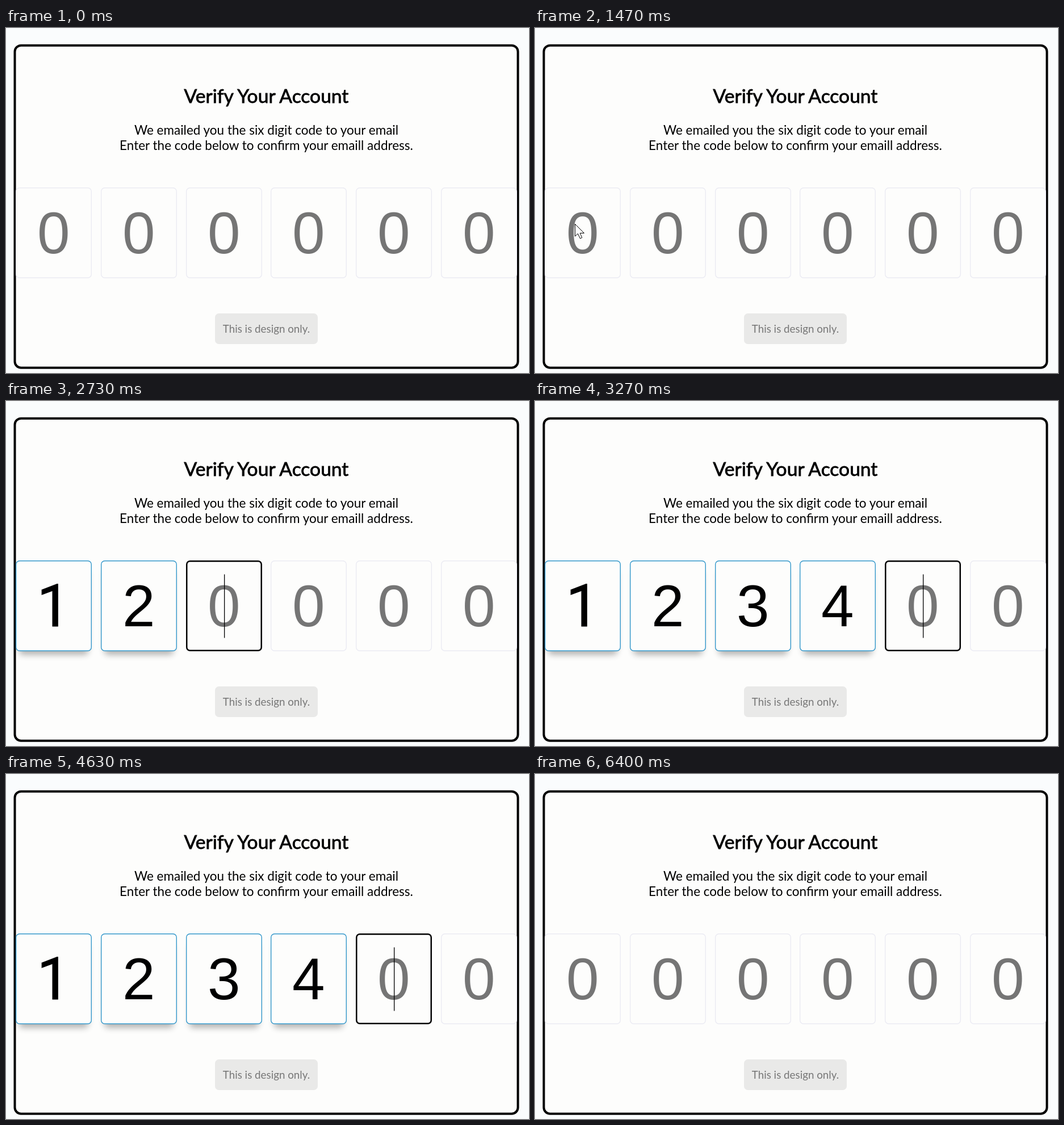
These frames come from a looping animation (921x608 px, 6.43 s). An HTML page:

```html
<!DOCTYPE html>
<html lang="en">
<head>
<meta charset="utf-8">
<title>Verify</title>
<style>
  html, body { margin: 0; width: 100%; height: 100%; overflow: hidden; background: #fafcfd; }
  svg { display: block; width: 921px; height: 608px; }
  text { font-family: Lato, "Open Sans", sans-serif; text-anchor: middle; }
  .title { font-size: 33.6px; stroke: #000; stroke-width: .8px; }
  .copy { font-size: 22.5px; }
  .digit { font-family: "Liberation Sans", Arial, sans-serif; font-size: 103.5px; }
  .digit.plain { font-family: Roboto, sans-serif; stroke: #000; stroke-width: 1px; }
</style>
</head>
<body>
<svg id="stage" viewBox="0 0 921 608">
  <defs>
    <filter id="blur" x="-20%" y="-20%" width="140%" height="140%"><feGaussianBlur stdDeviation="6"/></filter>
  </defs>
  <rect width="921" height="608" fill="#fafcfd"/>
  <rect x="15.5" y="30.7" width="886" height="568" rx="11" fill="#fdfdfc" stroke="#000" stroke-width="4"/>
  <text class="title" x="458.5" y="132">Verify Your Account</text>
  <text class="copy" x="458.5" y="188">We emailed you the six digit code to your email</text>
  <text class="copy" x="458.5" y="214.5">Enter the code below to confirm your emaill address.</text>
  <g id="cells"></g>
  <rect x="368" y="503" width="181" height="54" rx="7" fill="#e9e9e8"/>
  <text x="458.5" y="537" font-size="18.8" fill="#777">This is design only.</text>
  <path id="pointer" d="M0 0V21.5L5 17L9 25.5L12.3 24L8.8 16H16Z" fill="#fff" stroke="#000" stroke-width="1"/>
</svg>
<script>
  const LOOP = 6430;
  const CELL = { x: 17.2, y: 281, w: 134, h: 160, step: 149.7, radius: 7, count: 6 };
  const FOCUS = 1550, BLUR = 6150, BLINK = 500;
  const TYPED = [2350, 2620, 2880, 3150];
  const ERASE = 4700, ERASE_STEP = 50;
  const POINTER = { from: 520, to: 1750 };
  // time, x, y
  const TRAIL = [[520, 470, 262], [870, 245, 293], [1280, 70, 345]];

  const cellsGroup = document.getElementById("cells");
  const pointer = document.getElementById("pointer");

  function add(parent, tag, attrs) {
    const node = document.createElementNS("http://www.w3.org/2000/svg", tag);
    set(node, attrs);
    parent.appendChild(node);
    return node;
  }

  function set(node, attrs) {
    for (const key in attrs) node.setAttribute(key, attrs[key]);
  }

  function show(node, visible) {
    node.setAttribute("visibility", visible ? "visible" : "hidden");
  }

  function makeCell(_, i) {
    const { x, y, w, h, step } = CELL;
    const g = add(cellsGroup, "g", { transform: `translate(${Math.round(x + i * step)} ${y})` });
    return {
      shadow: add(g, "rect", { x: 6.5, y: 19, width: w - 13, height: h - 13, rx: 5, opacity: .3, filter: "url(#blur)" }),
      box: add(g, "rect", { fill: "#fdfdfc" }),
      digit: add(g, "text", { x: w / 2 - .3, y: 115.5 }),
      caret: add(g, "rect", { y: 24.5, width: 1.3, height: 112 })
    };
  }

  const cells = Array.from({ length: CELL.count }, makeCell);

  // Number of filled cells, the focused cell and when it was last touched.
  function formState(t) {
    if (t < FOCUS || t >= BLUR) return { filled: 0, focus: -1, since: 0 };
    if (t >= ERASE) {
      const press = Math.min(TYPED.length, Math.floor((t - ERASE) / ERASE_STEP));
      const filled = TYPED.length - press;
      return { filled, focus: Math.max(0, filled - 1), since: ERASE + press * ERASE_STEP };
    }
    const filled = TYPED.filter(time => t >= time).length;
    return { filled, focus: filled, since: filled ? TYPED[filled - 1] : FOCUS };
  }

  // The border lies inside the cell, as with border-box sizing.
  function drawBorder(box, stroke, line) {
    set(box, {
      x: line / 2, y: line / 2, width: CELL.w - line, height: CELL.h - line,
      rx: CELL.radius - line / 2, stroke, "stroke-width": line
    });
  }

  function drawCell(cell, i, t, state) {
    const full = i < state.filled;
    const focused = i === state.focus;
    if (focused) drawBorder(cell.box, "#000", 2.5);
    else drawBorder(cell.box, full ? "#3498cb" : "#ebebf3", 1.4);
    const digit = full ? i + 1 : 0;
    cell.digit.textContent = digit;
    set(cell.digit, { class: digit === 1 ? "digit plain" : "digit", fill: full ? "#000" : "#757575" });
    show(cell.shadow, full);
    show(cell.caret, focused && Math.floor((t - state.since) / BLINK) % 2 === 0);
    set(cell.caret, { x: CELL.w / 2 + (full ? 29 : 0) });
  }

  function drawPointer(t) {
    show(pointer, t >= POINTER.from && t < POINTER.to);
    const leg = t < TRAIL[1][0] ? 0 : 1;
    const [t0, x0, y0] = TRAIL[leg], [t1, x1, y1] = TRAIL[leg + 1];
    const p = Math.max(0, Math.min(1, (t - t0) / (t1 - t0)));
    const k = leg ? p * (2 - p) : p;
    set(pointer, { transform: `translate(${x0 + (x1 - x0) * k + .5} ${y0 + (y1 - y0) * k + .5})` });
  }

  function render(t) {
    const state = formState(t);
    cells.forEach((cell, i) => drawCell(cell, i, t, state));
    drawPointer(t);
  }

  const start = performance.now();
  function tick() {
    render((performance.now() - start) % LOOP);
    requestAnimationFrame(tick);
  }
  tick();
</script>
</body>
</html>
```
